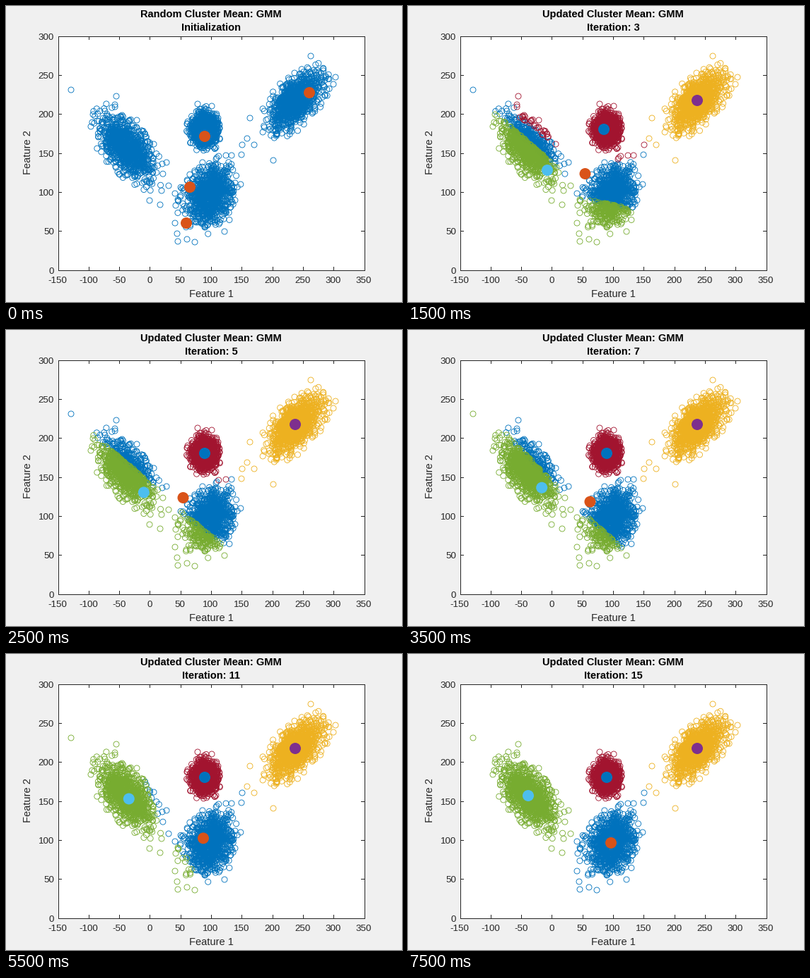
Animation of 560x420 px, one loop 8 s. Source, as a matplotlib script:

```python
import numpy as np
import matplotlib.pyplot as plt
from matplotlib.animation import FuncAnimation
from matplotlib.patches import Rectangle

W, H, DPI = 560, 420, 80
PX = 72 / DPI  # points per pixel
LEFT, RIGHT, TOP, BOTTOM = 73.5, 506.5, 42.5, 374.5
INK = "#262626"
BLUE, ORANGE, YELLOW, PURPLE = "#0072BD", "#D95319", "#EDB120", "#7E2F8E"
GREEN, CYAN, RED = "#77AC30", "#4DBEEE", "#A2142F"
LAYERS = np.array([BLUE, RED, YELLOW, GREEN])
plt.rcParams["font.family"] = "Liberation Sans"

# All positions are stage pixels with y pointing down.
# centre, spread, correlation, stray points
CLUSTERS = [
    ((170, 200), (18.5, 21.5), 0.58, [
        (92, 119), (156, 128), (154, 140), (133, 149), (120, 171), (203, 276),
        (218, 282), (220, 262), (230, 255), (227, 222), (221, 224), (209, 196),
        (193, 178)]),
    ((281, 175), (9.5, 11.3), 0.0, [(271, 139), (291, 142)]),
    ((287, 268), (16, 19.5), -0.2, [
        (239, 266), (247, 269), (240, 283), (239, 308), (242, 323), (243, 334),
        (256, 331), (267, 335), (309, 320), (334, 197), (333, 211), (319, 212),
        (311, 212)]),
    ((409, 134), (18, 20), -0.6, [
        (341, 188), (351, 197), (345, 159), (378, 219), (466, 101), (463, 111),
        (431, 71)]),
]


def make_points(rng, size=1000, cutoff=2.9):
    points, owner = [], []
    for i, (centre, spread, corr, strays) in enumerate(CLUSTERS):
        z = rng.standard_normal((size, 2))
        z = z[np.hypot(*z.T) < cutoff]
        z[:, 1] = corr * z[:, 0] + np.sqrt(1 - corr**2) * z[:, 1]
        group = np.vstack([z * spread + centre, strays])
        points.append(group)
        owner += [i] * len(group)
    return np.vstack(points), np.array(owner)


POINTS, OWNER = make_points(np.random.default_rng(4))
X, Y = POINTS.T


def moving_line(k, x0, x1, steps, y0, y1):
    """Height at every point of a line whose ends follow the iterations."""
    a, b = np.interp(k, steps, y0), np.interp(k, steps, y1)
    return a + (b - a) * (X - x0) / (x1 - x0)


def blob(cx, cy, rx, ry, power):
    return np.abs((X - cx) / rx)**power + np.abs((Y - cy) / ry)**power < 1


def labels(k):
    """Index into LAYERS for every point at iteration k."""
    out = np.zeros(len(X), int)
    if k < 2:
        return out
    left, middle, lower, right = (OWNER == i for i in range(4))
    out[middle] = 1
    if k == 2:
        out[lower & (Y < 224) & (X > 285) & (X < 302)] = 1
        out[right & blob(424, 126, 30, 43, 2.6)] = 2
        out[lower & blob(260, 311, 32, 30, 5)] = 3
        return out
    out[right] = 2
    split = moving_line(k, 130, 205, [3, 5, 7, 9, 11, 13],
                        [158, 154, 138, 80, 15, -200],
                        [224, 218, 217, 213, 203, 110])
    out[left & (Y > split)] = 3
    split = moving_line(k, 255, 300, [3, 5, 9, 11, 12],
                        [275, 264, 268, 289, 420], [284, 300, 315, 351, 420])
    out[lower & (Y > split)] = 3
    edge = np.interp(k, [3, 5, 9], [220, 214, 206])
    out[lower & (Y < edge - 0.6 * np.maximum(X - 310, 0))] = 1
    if k == 3:
        out[left & (X > 152) & (Y < 155 + 0.75 * (X - 153))] = 1
    elif k < 8:
        out[lower & (X > 331) & (Y < 213)] = 2
    return out


def glide(k, start, end, progress):
    t = np.interp(k, [3, 5, 9, 11, 12, 15], progress)
    return np.array(start) + t * np.subtract(end, start)


def means(k):
    if k < 2:
        return [(429, 123), (281, 185), (260, 257), (255, 308)]
    if k == 2:
        return [(418, 125), (281, 176), (278, 262), (269, 299)]
    return [(409, 134), (277 if k == 3 else 281, 175),
            glide(k, (250.5, 238), (287, 268), [0, 0, .38, .78, .9, 1]),
            glide(k, (197, 233), (170, 201), [0, .08, .5, .86, .93, 1])]


fig = plt.figure(figsize=(W / DPI, H / DPI), dpi=DPI, facecolor="#F0F0F0")
ax = fig.add_axes([0, 0, 1, 1])
ax.set(xlim=(0, W), ylim=(H, 0))
ax.axis("off")
ax.add_patch(Rectangle((LEFT, TOP), RIGHT - LEFT, BOTTOM - TOP,
                       facecolor="white", edgecolor=INK, lw=PX))


def text(x, y, s, size=14.67, color=INK, **kw):
    kw = {"ha": "center", "va": "baseline", **kw}
    return ax.text(x, y, s, fontsize=size * PX, color=color, **kw)


def tick(x, y, dx, dy):
    ax.plot([x, x + dx], [y, y + dy], color=INK, lw=PX)


for value in range(-150, 351, 50):
    x = LEFT + (value + 150) / 500 * (RIGHT - LEFT)
    tick(x, BOTTOM, 0, -4.5)
    tick(x, TOP, 0, 4.5)
    text(x - 0.5, 393, str(value), 13.33)
for value in range(0, 301, 50):
    y = BOTTOM - value / 300 * (BOTTOM - TOP)
    tick(LEFT, y, 4.5, 0)
    tick(RIGHT, y, -4.5, 0)
    text(68, y + 5, str(value), 13.33, ha="right")

text(290, 413, "Feature 1")
text(38, 208, "Feature 2", rotation=90, ha="right", va="center")
title = text(290, 16, "", color="black", weight="bold")
subtitle = text(290, 35, "", color="black", weight="bold")

dots = ax.scatter(X, Y, s=(8 * PX)**2, facecolors="none", edgecolors=BLUE,
                  linewidths=0.85 * PX, zorder=3)
centres = ax.scatter(*zip(*means(0)), s=(16 * PX)**2, c=ORANGE, linewidths=0,
                     zorder=4)


def draw(k):
    layer = labels(k)
    order = np.argsort(layer, kind="stable")
    dots.set_offsets(POINTS[order])
    dots.set_edgecolors(LAYERS[layer[order]])
    centres.set_offsets(means(k))
    centres.set_facecolors([ORANGE] * 4 if k < 2 else [PURPLE, BLUE, ORANGE, CYAN])
    title.set_text(("Random" if k < 2 else "Updated") + " Cluster Mean: GMM")
    subtitle.set_text("Initialization" if k < 2 else f"Iteration: {k}")
    return dots, centres, title, subtitle


anim = FuncAnimation(fig, draw, frames=16, interval=500, repeat=True)
plt.show()
```
